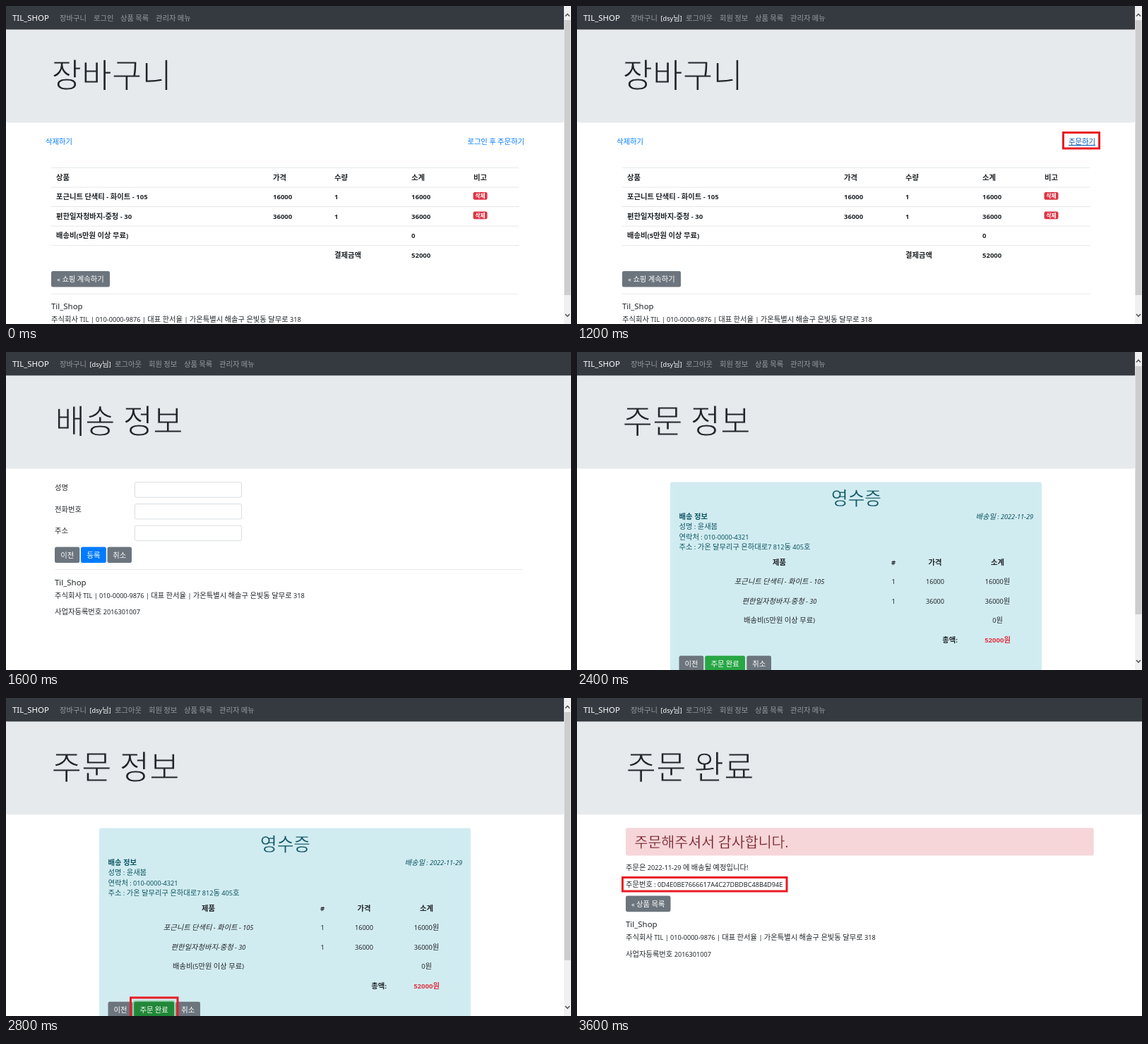
These frames come from a looping animation (800x451 px, 4 s). An HTML page:

```html
<!DOCTYPE html>
<html lang="ko">
<head>
<meta charset="utf-8">
<title>TIL_SHOP</title>
<style>
  html, body { margin: 0; width: 100%; height: 100%; overflow: hidden; background: #fff; }
  svg { display: block; width: 100vw; height: 100vh; font-family: "Noto Sans", "Noto Sans CJK KR", "Noto Sans CJK", sans-serif; }
  text { white-space: pre; }
</style>
</head>
<body>
<svg id="stage" viewBox="0 0 800 451"></svg>
<script>
const STEP = 400;
const BASE = 9.54;
const INK = '#212529', GRAY = '#6c757d', TEAL = '#0c5460', RED = '#dc3545';
const BANNER = '#e7eaed', PINK = '#f6d6d9', AQUA = '#d1ecf1';

const shop = { caps: 'TIL_SHOP', title: 'Til_Shop', firm: '주식회사 TIL' };
const user = 'dsy';
const footer = `${shop.firm} | 010-0000-9876 | 대표 한서율 | 가온특별시 해솔구 은빛동 달무로 318`;
const buyer = { name: '윤새봄', phone: '010-0000-4321', street: '가온 달무리구 은하대로7 812동', unit: ' 405호' };
const goods = [['포근니트 단색티 - 화이트 - 105', 16000], ['편한일자청바지-중청 - 30', 36000]];
const fee = '배송비(5만원 이상 무료)';

// Hangul is set a little larger than Latin so both share one visual size.
function text(x, y, str, { size = BASE, fill = INK, weight = 400, anchor = 'start', extra = '' } = {}) {
  const latin = size * (weight > 500 ? 1 : 0.96);
  const body = str.replace(/[가-힣]+/g, run => `<tspan font-size="${size * 1.08}">${run}</tspan>`);
  return `<text x="${x}" y="${y}" font-size="${latin}" fill="${fill}" font-weight="${weight}" text-anchor="${anchor}" ${extra}>${body}</text>`;
}

// An outline in the background colour makes the strokes of large type lighter.
const thin = (ground, width) => `stroke="${ground}" stroke-width="${width}"`;

const rect = (x, y, x2, y2, fill, r = 0, extra = '') =>
  `<rect x="${x}" y="${y}" width="${x2 - x}" height="${y2 - y}" rx="${r}" fill="${fill}" ${extra}/>`;

const rule = (x, x2, y, fill = '#dee2e6') => rect(x, y, x2, y + 0.8, fill);

const marker = (x, y, x2, y2) =>
  rect(x + 1.5, y + 1.5, x2 - 1.5, y2 - 1.5, 'none', 0, 'stroke="#e81c24" stroke-width="3"');

const button = (x, x2, y, label, fill = GRAY) =>
  rect(x, y, x2, y + 22.6, fill, 2.4) +
  text((x + x2) / 2, y + 15.1, label, { fill: '#fff', anchor: 'middle' });

function page(title, { member = true, thumb = 0 } = {}) {
  const right = thumb ? 790 : 800;
  const links = member
    ? [[76, '장바구니'], [154, '로그아웃'], [202, '회원 정보'], [252, '상품 목록'], [302, '관리자 메뉴']]
    : [[76, '장바구니'], [124, '로그인'], [162, '상품 목록'], [212, '관리자 메뉴']];
  let out = rect(0, 0, 800, 451, '#fff') +
    rect(0, 33.4, right, 165.5, BANNER, 3) +
    rect(0, 0, right, 33.4, '#343a40') +
    text(9, 21.3, shop.caps, { size: 11.92, fill: '#fff' }) +
    links.map(([x, label]) => text(x, 21, label, { fill: '#999c9f' })).join('') +
    text(thumb ? 64.5 : 69.5, 115, title, { size: 42.9, extra: thin(BANNER, 1.2) });
  if (member) out += text(118.5, 20.5, `[${user}님]`, { fill: '#fff' });
  if (thumb) out += rect(790, 0, 800, 451, '#f0f0f0') +
    rect(790.5, 20, 799.5, thumb, '#cdcdcd') +
    '<path d="M792 14.5l3-3.2 3 3.2M792 437l3 3.2 3-3.2" fill="none" stroke="#505050" stroke-width="1.6"/>';
  return out;
}

const about = (x, y) =>
  text(x, y, shop.title, { size: 11.92 }) +
  text(x, y + 18, footer) +
  text(x, y + 41.8, '사업자등록번호 2016301007');

function cart(member, hover) {
  const cols = [71, 378, 465, 574, 662];
  const rows = [
    ['상품', '가격', '수량', '소계', '비고'],
    ...goods.map(([name, price]) => [name, `${price}`, '1', `${price}`]),
    [fee, '', '', '0'],
    ['', '', '결제금액', '52000']
  ];
  let out = page('장바구니', { member, thumb: 410 }) +
    text(56, 196, '삭제하기', { fill: '#007bff' }) +
    text(734, 196, member ? '주문하기' : '로그인 후 주문하기', {
      fill: hover ? '#0056b3' : '#007bff', anchor: 'end',
      extra: hover ? 'text-decoration="underline"' : ''
    });
  rows.forEach((row, i) => {
    const y = 246.8 + i * 27.55;
    out += rule(64, 726, y - 17.7);
    row.forEach((cell, c) => { if (cell) out += text(cols[c], y, cell, { weight: 700 }); });
    if (i === 1 || i === 2) {
      out += rect(661.5, y - 10.4, 681.5, y + 0.3, RED, 2.2) +
        text(671.5, y - 2.3, '삭제', { size: 7.15, fill: '#fff', weight: 700, anchor: 'middle' });
    }
  });
  out += button(64, 147, 376, '« 쇼핑 계속하기') + rule(64, 726, 407.8, '#e5e5e5') + about(64, 430.3);
  return hover ? out + marker(member ? 687 : 645, 178, 741, 203.5) : out;
}

function delivery(filled) {
  const fields = [['성명', buyer.name], ['전화번호', buyer.phone], ['주소', buyer.street]];
  let out = page('배송 정보');
  fields.forEach(([label, value], i) => {
    const y = 184.8 + i * 30.7;
    out += text(69, y + 11.2, label) +
      rect(182.4, y, 333.6, y + 21.4, '#fff', 2.4, 'stroke="#ced4da" stroke-width=".8"');
    if (filled) out += text(190, y + 15.4, value, { fill: '#495057' });
  });
  out += button(69, 104.3, 276.5, '이전') +
    button(106, 141.8, 276.5, '등록', filled ? '#0069d9' : '#007bff') +
    button(143.5, 178, 276.5, '취소') +
    rule(69, 731.5, 308, '#e5e5e5') + about(69, 330.6);
  return filled ? out + marker(103, 272.5, 144.5, 302) : out;
}

function receipt(hover) {
  const mid = { anchor: 'middle' };
  const bold = { ...mid, weight: 700 };
  const lines = [`성명 : ${buyer.name}`, `연락처 : ${buyer.phone}`, `주소 : ${buyer.street}${buyer.unit}`];
  const rowY = i => 301.6 + i * 27.55;
  let out = page('주문 정보', { thumb: 372 }) +
    rect(132, 184.5, 658, 460, AQUA, 2.4) +
    text(395.5, 216.8, '영수증', { ...mid, size: 23.84, fill: TEAL, extra: thin(AQUA, 0.3) }) +
    text(144.5, 237, '배송 정보', { fill: TEAL, weight: 700 }) +
    text(646, 237, '배송일 : 2022-11-29', { fill: TEAL, anchor: 'end', extra: 'font-style="italic"' });
  lines.forEach((line, i) => { out += text(144.5, 251.4 + i * 14.3, line, { fill: TEAL }); });
  [[286.5, '제품'], [448, '#'], [507, '가격'], [595.5, '소계']]
    .forEach(([x, label]) => { out += text(x, rowY(0), label, bold); });
  goods.forEach(([name, price], i) => {
    const y = rowY(i + 1);
    out += text(286.5, y, name, { ...mid, extra: 'font-style="italic"' }) +
      text(448, y, '1', mid) + text(507, y, `${price}`, mid) + text(595.5, y, `${price}원`, mid);
  });
  out += text(286.5, rowY(3), fee, mid) + text(595.5, rowY(3), '0원', mid) +
    text(539, rowY(4), '총액:', { weight: 700, anchor: 'end' }) +
    text(595.5, rowY(4), '52000원', { ...bold, fill: RED }) +
    button(144.5, 179.3, 430.8, '이전') + button(240.3, 275, 430.8, '취소');
  if (hover) out += rect(179.4, 429, 239.8, 455.2, '#8fcfa5', 3.6);
  out += button(181.2, 238, 430.8, '주문 완료', hover ? '#218838' : '#28a745');
  return hover ? out + marker(175, 423.5, 244.5, 456) : out;
}

function done(marked) {
  const out = page('주문 완료') +
    rect(69, 184.3, 731.7, 223.5, PINK, 2.4) +
    text(81.5, 212.4, '주문해주셔서 감사합니다.', { size: 19.07, fill: '#721c24', extra: thin(PINK, 0.3) }) +
    text(69, 243.6, '주문은 2022-11-29 에 배송될 예정입니다!') +
    text(69, 267.6, '주문번호 : 0D4E0BE7666617A4C27DBDBC48B4D94E') +
    button(69, 132.5, 280.6, '« 상품 목록') + about(69, 324.7);
  return marked ? out + marker(63, 253, 298.5, 275.5) : out;
}

const plan = [
  cart(false, false), cart(false, true), cart(true, false), cart(true, true),
  ...[delivery, receipt, done].flatMap(scene => [scene(false), scene(true)])
];

const stage = document.getElementById('stage');
stage.innerHTML = plan.map(scene => `<g visibility="hidden">${scene}</g>`).join('');
const views = [...stage.children];
let shown = -1;

function draw(now) {
  const next = Math.floor(now / STEP) % views.length;
  if (next !== shown) {
    views.forEach((view, i) => view.setAttribute('visibility', i === next ? 'visible' : 'hidden'));
    shown = next;
  }
}

const start = performance.now();
function tick() {
  draw(performance.now() - start);
  requestAnimationFrame(tick);
}
tick();
</script>
</body>
</html>
```
